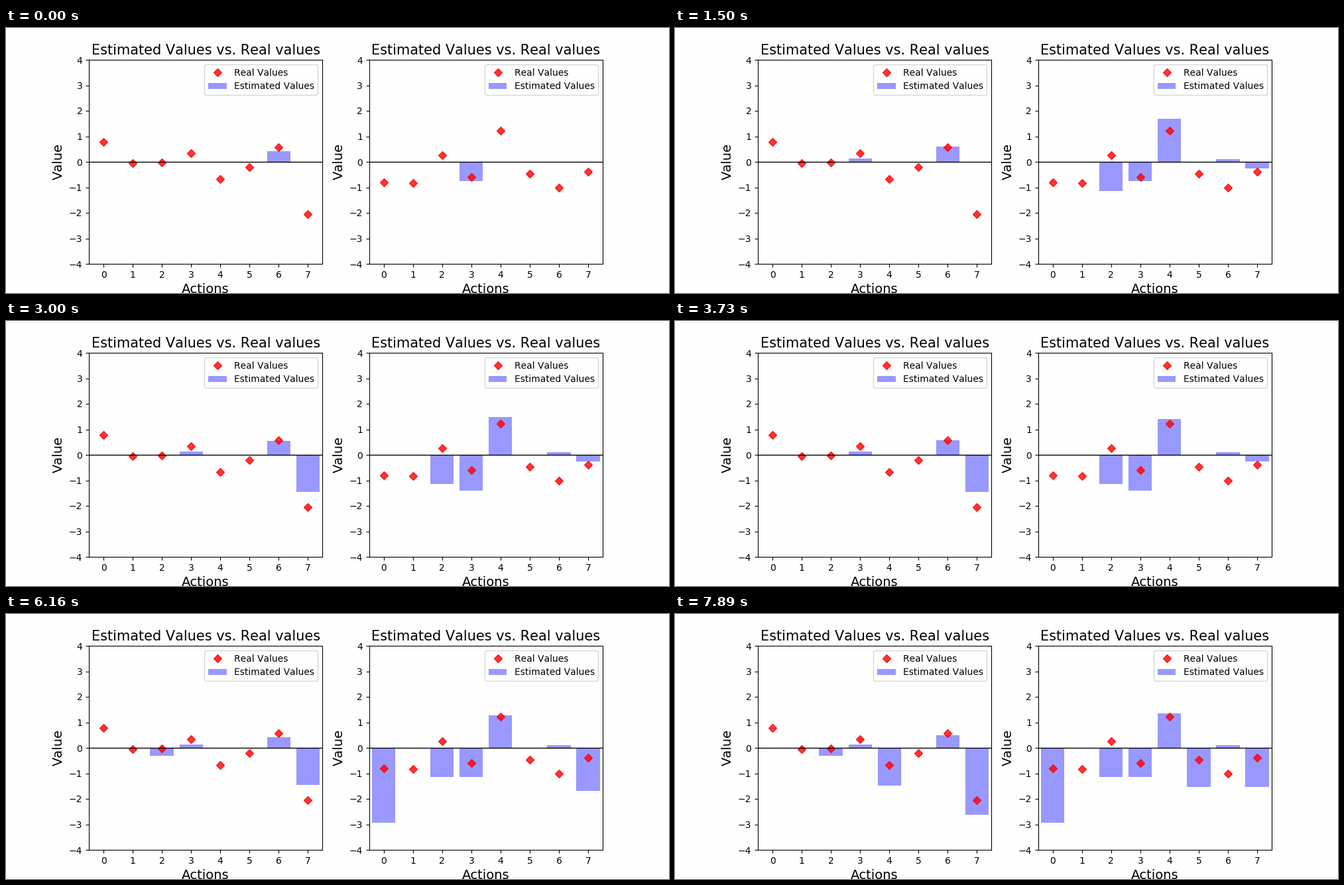
A matplotlib script for the animation above (7.99 s loop, 1000 by 400 pixels).

```python
import numpy as np
import matplotlib.pyplot as plt
from matplotlib.animation import FuncAnimation

LOOP_MS = 7990
FRAMES = 170
STEPS = 82
STEP_MS = 100
SHORT_MS = 30
RELAX = 0.12  # share of the error removed by a repeat pull

plt.rcParams.update({
    "text.kerning_factor": 6,  # whole-pixel kerning
    "figure.facecolor": "#fefefe",
    "axes.facecolor": "#fefefe",
})

# greedy: the action pulled most, with key (step, estimate) points.
# pulls: other actions as (step, action, estimate); an estimate of None
# is a repeat pull that eases the bar towards its real value.
LEFT = dict(
    real=[0.78, -0.05, -0.02, 0.34, -0.67, -0.20, 0.57, -2.05],
    greedy=6,
    keys=[(0, 0.42), (7, 0.68), (22, 0.53), (38, 0.58), (50, 0.53),
          (63, 0.42), (81, 0.50)],
    pulls=[(4, 3, 0.13), (19, 7, -1.45), (54, 2, -0.31), (69, 4, -1.48),
           (72, 7, -2.62)],
)
RIGHT = dict(
    real=[-0.80, -0.83, 0.26, -0.60, 1.22, -0.47, -1.01, -0.39],
    greedy=4,
    keys=[(2, 2.29), (7, 1.74), (16, 1.69), (22, 1.54), (38, 1.41),
          (50, 1.30), (63, 1.28), (81, 1.35)],
    pulls=[(0, 3, -0.75), (1, 2, -1.14), (11, 6, 0.10), (14, 7, -0.25),
           (20, 3, -1.63), (44, 7, -1.68), (61, 0, -2.93), (77, 5, -1.53),
           (79, 7, None)]
    + [(step, 3, None) for step in (26, 29, 43, 45, 47)],
)


def greedy_path(keys, rng):
    """Key points joined by lines, with noise that fades as pulls add up."""
    key_steps, values = np.array(keys).T
    steps = np.arange(STEPS)
    noise = rng.uniform(-0.2, 0.2, STEPS) / (steps + 8)
    noise[key_steps.astype(int)] = 0
    return np.interp(steps, key_steps, values, left=0) + noise * (steps > key_steps[0])


def estimates(bandit, rng):
    """Estimated value of every action at every step."""
    real = bandit["real"]
    table = np.zeros((STEPS, len(real)))
    for step, action, value in sorted(bandit["pulls"], key=lambda p: p[0]):
        if value is None:
            old = table[step, action]
            value = old + RELAX * (real[action] - old)
        table[step:, action] = value
    table[:, bandit["greedy"]] = greedy_path(bandit["keys"], rng)
    return table


def draw_panel(ax, real):
    actions = range(len(real))
    ax.plot(actions, real, "D", color="red", alpha=0.8, label="Real Values")
    bars = ax.bar(actions, np.zeros(len(real)), color="blue", alpha=0.4,
                  label="Estimated Values")
    ax.axhline(0, color="black", lw=1, zorder=3)
    ax.set(xlim=(-0.5, 7.5), ylim=(-4, 4),
           xticks=actions, yticks=range(-4, 5))
    ax.set_title("Estimated Values vs. Real values", fontsize=15)
    ax.set_xlabel("Actions", fontsize=14)
    ax.set_ylabel("Value", fontsize=14)
    ax.legend(loc="upper right")
    return bars


durations = np.full(STEPS, STEP_MS)
durations[[29, 46, 78]] = SHORT_MS
step_ends = np.cumsum(durations)

fig, axes = plt.subplots(1, 2, figsize=(10, 4), dpi=100)
rng = np.random.default_rng(4)
panels = [(draw_panel(ax, bandit["real"]), estimates(bandit, rng))
          for ax, bandit in zip(axes, (LEFT, RIGHT))]


def update(frame):
    now = (frame + 1) * LOOP_MS / FRAMES - 1
    step = np.searchsorted(step_ends, now, side="right")
    for bars, table in panels:
        for bar, value in zip(bars, table[step]):
            bar.set_height(value)
    return [bar for bars, _ in panels for bar in bars]


anim = FuncAnimation(fig, update, frames=FRAMES, interval=LOOP_MS / FRAMES,
                     repeat=True, repeat_delay=0)
plt.show()
```
